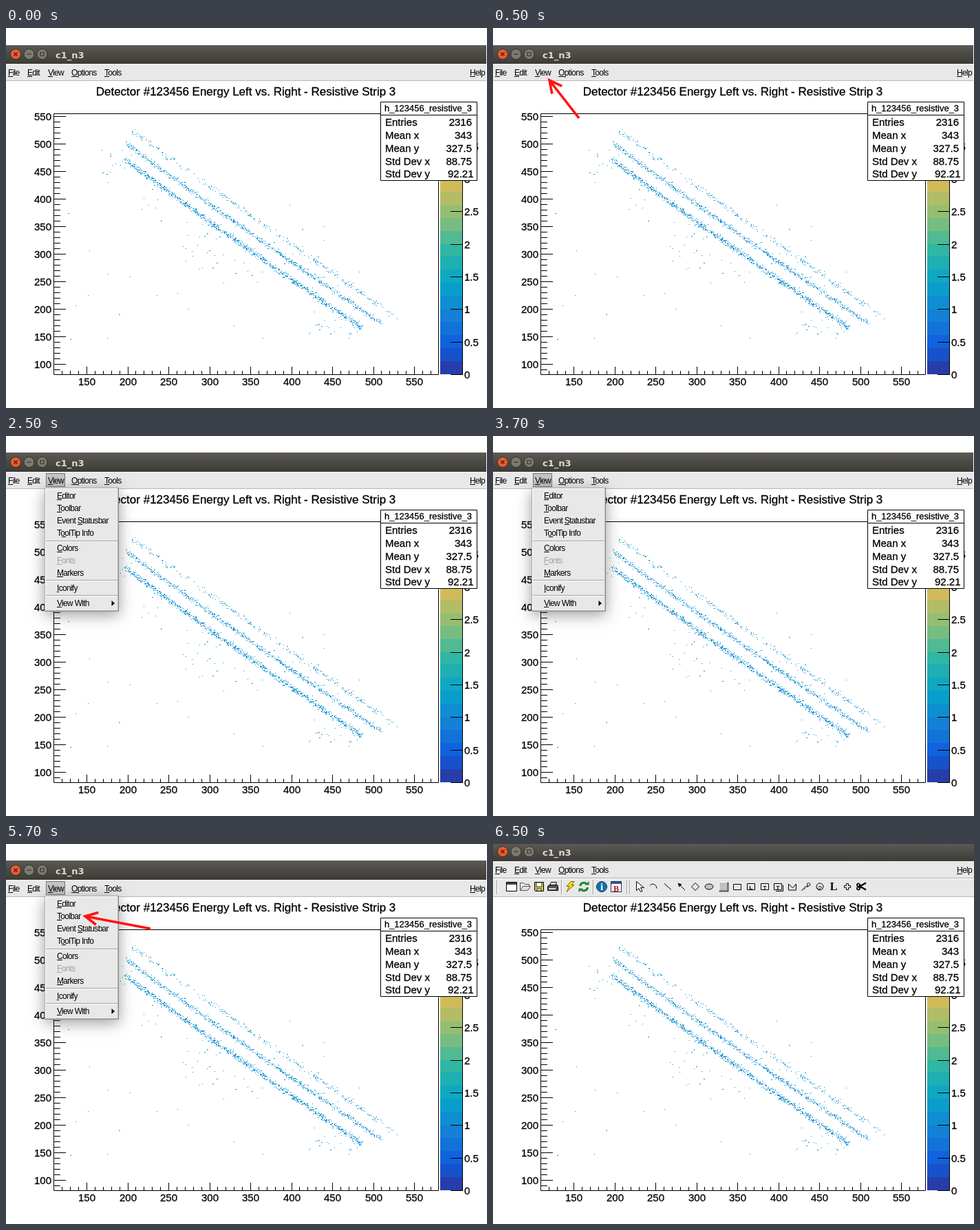
An HTML page with a canvas for the animation above (8000 ms loop, 699 by 552 pixels).

```html
<!DOCTYPE html>
<html>
<head>
<meta charset="utf-8">
<style>
html, body { margin: 0; width: 100%; height: 100%; overflow: hidden; background: #fff; }
canvas { display: block; }
</style>
</head>
<body>
<canvas id="stage" width="699" height="552"></canvas>
<script>
const ctx = document.getElementById('stage').getContext('2d');
const SANS = '"Liberation Sans", Arial, sans-serif';

function rect(x, y, w, h, color) {
  ctx.fillStyle = color;
  ctx.fillRect(x, y, w, h);
}

function text(s, x, y, size, align = 'left', color = '#000', font = SANS) {
  ctx.font = `${size}px ${font}`;
  ctx.textAlign = align;
  ctx.fillStyle = color;
  ctx.fillText(s, x, y);
}

// Plot lettering is slightly heavier than the menus
function plotText(s, x, y, size, align) {
  text(s, x, y, size, align);
  ctx.strokeStyle = '#000';
  ctx.lineWidth = 0.3;
  ctx.strokeText(s, x, y);
}

function path(d, stroke, fill, width = 1) {
  const p = new Path2D(d);
  if (fill) { ctx.fillStyle = fill; ctx.fill(p); }
  if (stroke) { ctx.strokeStyle = stroke; ctx.lineWidth = width; ctx.stroke(p); }
}

function circle(x, y, r, fill, stroke) {
  ctx.beginPath();
  ctx.arc(x, y, r, 0, 7);
  ctx.fillStyle = fill;
  ctx.fill();
  ctx.strokeStyle = stroke;
  ctx.lineWidth = 1;
  ctx.stroke();
}

// Raised (or sunken) panel edges
function bevel(x, y, w, h, light, dark) {
  rect(x, y, w, 1, light);
  rect(x, y, 1, h, light);
  rect(x, y + h - 1, w, 1, dark);
  rect(x + w - 1, y, 1, h, dark);
}

// ---------- scatter data ----------
let seed = 7;
function rnd() {
  seed = (seed * 16807) % 2147483647;
  return seed / 2147483647;
}
const gauss = () => rnd() + rnd() + rnd() + rnd() - 2;

const dots = [];
const addDot = (x, y) => dots.push([Math.round(x), Math.round(y), rnd() < 0.15 ? 2 : 1]);

// x0, y0, x1, y1, sag, spread, count
for (const [x0, y0, x1, y1, sag, spread, n] of [
  [183, 149, 568, 421, 1, 3.6, 270],
  [174, 167, 547, 430, 3, 3.6, 720],
  [173, 191, 516, 435, 3, 4, 950]
]) {
  for (let i = 0; i < n; i++) {
    const t = rnd();
    addDot(x0 + (x1 - x0) * t + gauss(), y0 + (y1 - y0) * t + 4 * sag * t * (1 - t) + gauss() * spread);
  }
}
// Loose clouds: centre, half size, count
for (const [x, y, w, h, n] of [
  [285, 310, 34, 34, 24], [480, 428, 40, 20, 28], [160, 203, 22, 26, 14],
  [345, 345, 40, 26, 10], [440, 345, 60, 45, 14], [230, 255, 30, 25, 10]
]) {
  for (let i = 0; i < n; i++) addDot(x + gauss() * w, y + gauss() * h);
}
const strays = [
  412, 257, 430, 292, 90, 269, 121, 323, 148, 357, 140, 210, 119, 388, 219, 388, 164, 416,
  101, 403, 93, 452, 147, 450, 331, 432, 373, 450, 372, 354, 482, 374, 513, 354, 180, 361,
  265, 408, 249, 385, 225, 280, 151, 186, 430, 317, 453, 332
];
for (let i = 0; i < strays.length; i += 2) addDot(strays[i], strays[i + 1]);

// ---------- plot ----------
const palette = [
  [53, 42, 135], [15, 92, 221], [20, 129, 214], [6, 164, 202], [46, 183, 164],
  [135, 191, 119], [209, 187, 89], [254, 200, 50], [249, 251, 14]
];
function shade(t) {
  const i = Math.floor(t * 8), f = t * 8 - i;
  return `rgb(${palette[i].map((c, k) => c + (palette[i + 1][k] - c) * f)})`;
}

function drawPlot() {
  rect(0, 77, 699, 475, '#fff');
  for (const [x, y, w] of dots) rect(x, y, w, 1, shade(0.2995));

  path('M69.5 124.5H628.5V503.5H69.5Z', '#000');
  for (let v = 90; v <= 550; v += 10) {
    const y = Math.round(488 - (v - 100) * 0.8), major = v % 50 === 0;
    rect(70, y, major ? 17 : 9, 1, '#000');
    if (major) plotText(v, 66, y + 6, 15, 'right');
  }
  for (let v = 120; v <= 570; v += 10) {
    const x = Math.round(117 + (v - 150) * 1.19), major = v % 50 === 0;
    rect(x, major ? 492 : 498, 1, major ? 12 : 6, '#000');
    if (major) plotText(v, x + 0.5, 519, 15, 'center');
  }

  for (let i = 0; i < 20; i++) {
    const y = Math.round(503 - (i + 1) * 18.95);
    rect(631, y, 32, Math.round(503 - i * 18.95) - y, shade((i + 0.99) / 20));
  }
  rect(663, 124, 1, 380, '#000');
  for (let v = 0; v <= 4; v += 0.5) {
    const y = Math.round(503 - v * 94.7);
    rect(646, y, 17, 1, '#000');
    plotText(v, 666, y + 6, 15, 'left');
  }

  plotText('Detector #123456 Energy Left vs. Right - Resistive Strip 3', 348.5, 98, 17, 'center');
  path('M544.5 107.5H684.5V221.5H544.5ZM544.5 126.5H684.5', '#000', '#fff');
  plotText('h_123456_resistive_3', 613.5, 121, 13, 'center');
  [['Entries', '2316'], ['Mean x', '343'], ['Mean y', '327.5'], ['Std Dev x', '88.75'], ['Std Dev y', '92.21']]
    .forEach(([name, value], i) => {
      const y = Math.round(142 + i * 18.85);
      plotText(name, 551, y, 15, 'left');
      plotText(value, i === 4 ? 679.5 : 677, y, 15, 'right');
    });
}

// ---------- window ----------
function label(s, x, y, key = 0, color = '#000') {
  ctx.letterSpacing = '-0.7px';
  text(s, x, y, 12, 'left', color);
  const from = ctx.measureText(s.slice(0, key)).width;
  const wide = ctx.measureText(s[key]).width;
  ctx.letterSpacing = '0px';
  rect(Math.round(x + from), y + 1, Math.max(3, Math.round(wide)), 1, color);
}

function drawWindow(top, bottom, width) {
  const g = ctx.createLinearGradient(0, top, 0, bottom);
  g.addColorStop(0, '#5b5952');
  g.addColorStop(1, '#3d3b37');
  rect(0, top, width, bottom - top, g);
  const y = bottom - 14;
  circle(14, y, 7.5, '#ec5b30', '#35332f');
  path(`M11.5 ${y - 2.5}l5 5m0 -5l-5 5`, '#4a2015', null, 1.4);
  circle(33.5, y, 7.5, '#7d7a70', '#35332f');
  path(`M30.5 ${y}h6`, '#393732', null, 1.4);
  circle(52.5, y, 7.5, '#7d7a70', '#35332f');
  path(`M50 ${y - 2.5}h5v5h-5z`, '#393732', null, 1.2);
  text('c1_n3', 72, bottom - 8, 'bold 13', 'left', '#dfdbd2', '"DejaVu Sans", sans-serif');

  rect(0, bottom, width, 77 - bottom, '#e8e8e8');
  rect(0, bottom, width, 1, '#f8f8f8');
  rect(0, 76, width, 1, '#b8b8b8');
}

function drawMenuBar(y) {
  [['File', 3], ['Edit', 31], ['View', 61], ['Options', 95], ['Tools', 143], ['Help', 674]]
    .forEach(([s, x]) => label(s, x, y));
}

function drawDropdown() {
  rect(58, 54, 28, 20, '#c4c4c4');
  bevel(58, 54, 28, 20, '#777', '#777');
  ctx.save();
  ctx.shadowColor = 'rgba(0,0,0,.38)';
  ctx.shadowBlur = 20;
  ctx.shadowOffsetY = 5;
  rect(56, 75, 108, 180, '#e8e8e8');
  ctx.restore();
  bevel(56, 75, 108, 180, '#aaa', '#888');
  bevel(57, 76, 106, 178, '#fff', '#c0c0c0');
  [['Editor', 91], ['Toolbar', 109], ['Event Statusbar', 127, 6], ['ToolTip Info', 145, 1], ['Colors', 167],
    ['Fonts', 185, 0, '#a0a0a0'], ['Markers', 203], ['Iconify', 225], ['View With', 247]]
    .forEach(([s, y, key, color]) => label(s, 74, y, key, color));
  for (const y of [152, 209, 231]) {
    rect(58, y, 104, 1, '#a0a0a0');
    rect(58, y + 1, 104, 1, '#fff');
  }
  path('M153.5 239l4.5 4l-4.5 4z', null, '#000');
}

// Icons: centre x, path, stroke, fill, line width; drawn around the origin
const icons = [
  [27, 'M-7.5 -6.5h15v13h-15z', '#000', '#fff'],
  [27, 'M-7 -6h14v3h-14z', null, '#444'],
  [47, 'M-7.5 5.5v-11h5l2 2h6v3m-13 6l4 -6h11l-4 6z', '#555', '#e4e4dc'],
  [67, 'M-6.5 -6.5h13v13h-12l-1 -1z', '#000', '#c9c63c'],
  [67, 'M-4 -6h8v6h-8zM-3 3h6v3h-6z', '#333', '#fff'],
  [87, 'M-4.5 -1.5l2 -5h8l-2 5z', '#000', '#fff'],
  [87, 'M-7.5 -.5l2 -2h12l1 2v6h-15z', '#000', '#555'],
  [87, 'M-6 2h10v2h-10z', null, '#d8d8d8'],
  [112, 'M1 -7.5h5l-4 5h4l-11 10l4 -8h-4z', '#806000', '#ffdc10'],
  [132, 'M-5.5 -1a5.5 5.5 0 0 1 9 -3.5M5.5 1a5.5 5.5 0 0 1 -9 3.5', '#158a25', null, 3],
  [132, 'M1 -2.5h6.5v-5.5zM-1 2.5h-6.5v5.5z', null, '#158a25'],
  [158, 'M-7.5 0a7.5 7.5 0 1 0 15 0a7.5 7.5 0 1 0 -15 0', '#0b3f68', '#176fa8'],
  [179, 'M-7.5 -7.5h15v15h-15z', '#1b2f50', '#fff'],
  [179, 'M-7 -7h14v3h-14z', null, '#2c5a96'],
  [214, 'M-5.5 -7.5v13l3.5 -3l2.5 5l2.5 -1l-2.5 -5h5z', '#000', '#fff'],
  [233, 'M-5 -1.5c3 -4 9 -3 10 4', '#000'],
  [254, 'M-5 -4.5l10 9', '#000'],
  [274, 'M5 5l-9 -9', '#000'],
  [274, 'M-5.5 -5.5l6 2l-4 4z', null, '#000'],
  [294, 'M0 -5.5l5.5 5.5l-5.5 5.5l-5.5 -5.5z', '#000'],
  [314, 'M-6 0a6 4 0 1 0 12 0a6 4 0 1 0 -12 0', '#000', '#c0c0c0'],
  [335, 'M-6.5 -6.5h13v13h-13z', '#fff', '#c0c0c0'],
  [335, 'M-6.5 6.5h13v-13', '#555', null, 2],
  [355, 'M-5.5 -3.5h11v8h-11z', '#000'],
  [375, 'M-5.5 -4.5h11v9h-11z', '#000'],
  [395, 'M-5.5 -4.5h11v9h-11z', '#000'],
  [415, 'M-6.5 -4.5h11v9h-11zM-4 6.5h10.5v-9', '#000'],
  [435, 'M-5.5 5v-9l6 6l5 -6v9z', '#000'],
  [455, 'M-6 6c1 -6 5 0 4 -4c-2 -4 5 0 4 -4c-2 -5 4 -4 4 -1c-1 4 -5 0 -4 4', '#000'],
  [475, 'M-5 0a5 5 0 1 0 10 0a5 5 0 1 0 -10 0M-2 1a2 2 0 1 1 4 1c-2 2 -4 2 -6 0', '#000'],
  [515, 'M-1.5 -4.5h3v3h3v3h-3v3h-3v-3h-3v-3h3z', '#000'],
  [535, 'M7 -5.5l-9 5l9 5', '#000', null, 2.5],
  [535, 'M-2 -2a2 2 0 1 1 -4 -1a2 2 0 1 1 4 1M-2 2a2 2 0 1 0 -4 1a2 2 0 1 0 4 -1', '#000', null, 1.8]
];

function drawToolbar() {
  rect(0, 49, 699, 1, '#b0b0b0');
  rect(0, 50, 699, 1, '#fff');
  for (const x of [5, 99, 145, 194, 198]) {
    rect(x, 52, 1, 21, '#a0a0a0');
    rect(x + 1, 52, 1, 21, '#fff');
  }
  for (const [x, d, stroke, fill, width] of icons) {
    ctx.save();
    ctx.translate(x, 62);
    path(d, stroke, fill, width);
    ctx.restore();
  }
  const serif = '"Liberation Serif", serif';
  text('i', 158, 67, 'bold 15', 'center', '#fff', serif);
  text('B', 179, 69, 'bold 12', 'center', '#b01515', serif);
  text('L', 375, 65.5, 'bold 8', 'center');
  text('T', 395, 65.5, 'bold 8', 'center');
  text('T', 414, 65.5, 'bold 8', 'center');
  text('L', 495, 67, 'bold 16', 'center', '#000', serif);
}

function arrow(x, y, tailX, tailY) {
  const a = Math.atan2(tailY - y, tailX - x);
  const barb = s => `${x + 20 * Math.cos(a + s)} ${y + 20 * Math.sin(a + s)}`;
  path(`M${tailX} ${tailY}L${x} ${y}M${barb(0.47)}L${x} ${y}L${barb(-0.47)}`, '#ff1212', null, 3.6);
}

// ---------- timeline ----------
const cuts = [500, 2500, 4500, 6500, 8000];

function draw(step) {
  const menuOpen = step === 2 || step === 3;
  rect(0, 0, 699, 77, '#fff');
  drawPlot();
  if (step === 4) {
    drawWindow(0, 25, 699);
    drawMenuBar(42);
    drawToolbar();
  } else {
    drawWindow(menuOpen ? 24 : 25, 52, 698);
    if (menuOpen) drawDropdown();
    drawMenuBar(69);
  }
  if (step === 1) arrow(82, 76, 125, 131);
  if (step === 3) arrow(115, 105, 210, 123);
}

let shown = -1;
const start = performance.now();
function tick() {
  const t = (performance.now() - start) % 8000;
  const step = cuts.findIndex(c => t < c);
  if (step !== shown) draw(shown = step);
  requestAnimationFrame(tick);
}
tick();
</script>
</body>
</html>
```
